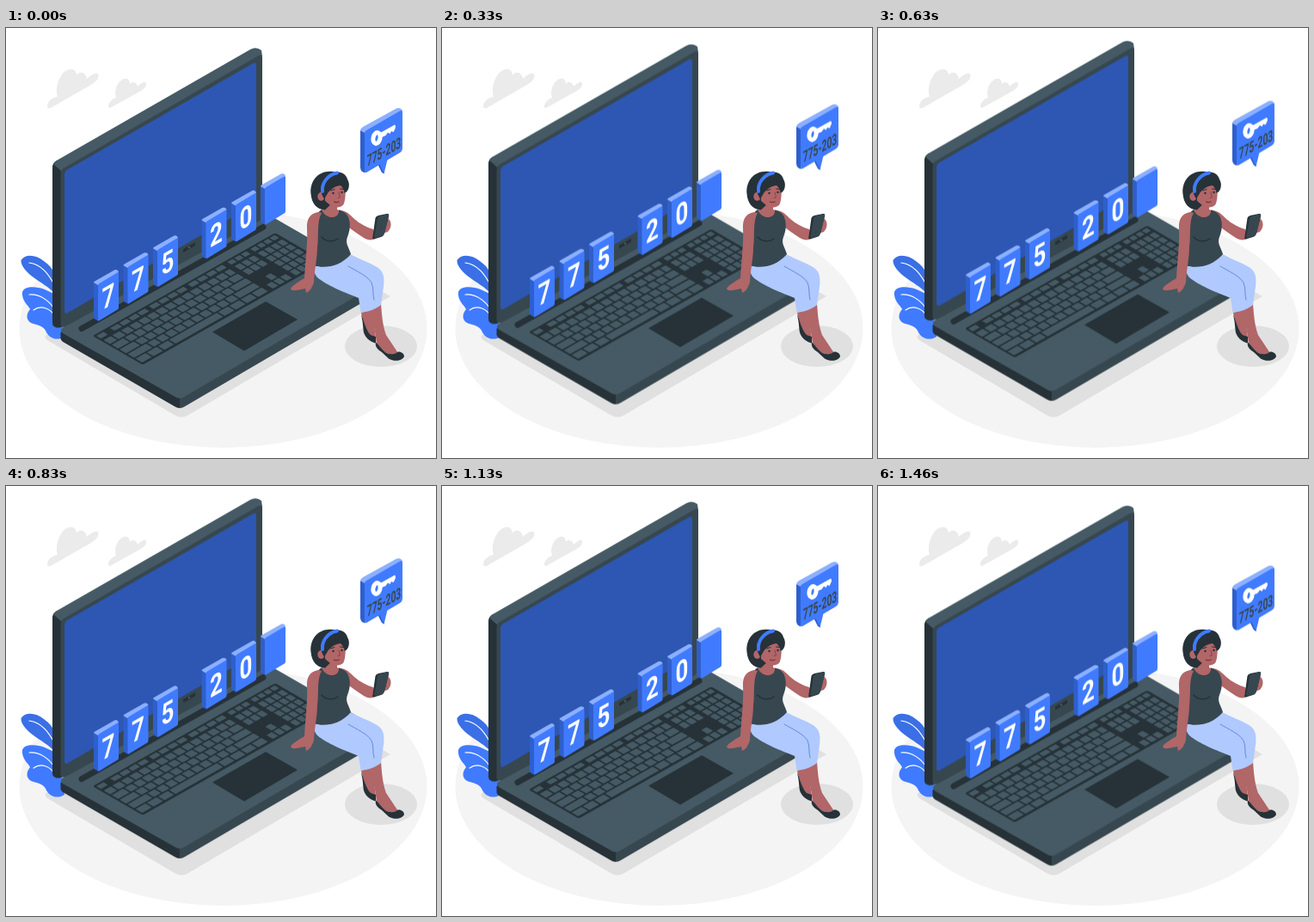
An HTML page that plays this animation: 500x500 px, repeating every 1500 ms.

```html
<!DOCTYPE html>
<html lang="en">
<head>
<meta charset="utf-8">
<title>Verification code</title>
<style>
  html, body { margin: 0; width: 100%; height: 100%; overflow: hidden; background: #fff; }
  svg { display: block; width: 100vw; height: 100vh; }
  text { font-family: Roboto, "Liberation Sans", sans-serif; text-anchor: middle; }
  .ink { fill: #263238; }
  .slate { fill: #37474f; }
  .steel { fill: #455a64; }
  .blue { fill: #407bff; }
  .navy { fill: #2d57b3; }
  .side { fill: #2f5fcc; }
  .sky { fill: #8cb0ff; }
  .skin { fill: #b16668; }
  .mist { fill: #e0e0e0; }
  .cloud { fill: #ebebeb; }
  .line { fill: none; stroke-linecap: round; stroke-linejoin: round; }
</style>
</head>
<body>
<svg viewBox="0 0 500 500">
  <ellipse cx="252.500" cy="349.500" rx="237" ry="138.500" fill="#f4f4f4"/>
  <g class="cloud">
    <path d="M48 91C48 86 53 81 60 80C56 68 64 49 74 48C79 47 82 51 82 55C86 49 93 52 94 59C99 54 107 50 107.500 55C108 59 104 63 99 66L52 93Q48 94 48 91Z"/>
    <path d="M119 91C119 87 123 83 128 81C125 71 131 60 138 59C142 58 144 62 144 65C148 61 152 64 153 68C157 64 163 60 163 65C163 69 160 71 157 73L122 92.500Q119 94 119 91Z"/>
  </g>
  <path class="mist" d="M48 363Q43 359 48 356L290 222L447 312L212 450Q204 455 196 450Z"/>

  <path fill="#3a6fe6" d="M17.500 270C22 263 34 263 44 271C51 276 55 281 58 290V310C50 301 40 296 32 290C25 285 17 277 17.500 270Z"/>
  <path class="blue" d="M19 307C22 299 36 301 45 304L62 312L68 359C62 363 52 363 47 354C45 348 40 346 32 344C24 342 22 334 28 327C26 322 18 318 19 307Z"/>
  <path class="line" stroke="#fff" stroke-width="1.200" d="M27 273C42 275 50 287 57 300M27 310C40 309 52 318 58 330M32 328C40 322 52 325 58 337"/>

  <g id="float">
    <!-- base -->
    <path class="ink" d="M63.500 354V361Q64 364 68 366L196 440Q199 442 202 442V426L70 350Z"/>
    <path class="slate" d="M202 426V442Q205 442 208 440L425 313Q429 310 429 300L420 296Z"/>
    <path class="steel" d="M66 355Q61 351 68 347L294 213Q297 212 300 214L418 282Q432 290 424 302L207 429Q202 432 197 429Z"/>
    <path class="line" stroke="#263238" stroke-width="7" d="M88 349.500L299 231.500"/>
    <g id="keys" transform="matrix(1 -.565 1 .58 101 358)"></g>
    <path class="ink" d="M240 353.500L302 318L339 339L277 375.500Z"/>
    <!-- lid -->
    <path class="ink" d="M54 162Q54 157 59 154L66 166V347Q60 350 56 347Q54 346 54 343Z"/>
    <path class="steel" d="M55 158Q56 156 59 154L284 25Q291 21 297 26L298 33L66 168Z"/>
    <path class="slate" d="M63.500 170Q63.500 165 67 163L292 33Q298 29 298 34V219Q298 222 295 224L69 347Q64 349 63.500 345Z"/>
    <path class="navy" d="M68 171Q68 167 71 165L287.500 41Q291 39.500 291 43V198Q291 203 287 206L72 331Q68 333 68 329Z"/>
    <path class="ink" d="M206 257L220 249V253L206 261Z"/>
    <circle class="steel" cx="213" cy="255" r="1.300"/>
    <g id="cards"></g>
    <!-- speech bubble -->
    <path class="side" d="M432 158L437 168L440 169.500L440 154Z"/>
    <path class="blue" d="M434 158L439.500 169.500L443.500 153Z"/>
    <path class="side" d="M412 119L417.500 121V168.500Q412 167 412 162Z"/>
    <path class="sky" d="M412 119Q412 117 415 115L454 93.500Q458 92 460.500 95L461 97L417 122Z"/>
    <path class="blue" d="M417 122Q417 120 419 119L458 96.500Q461 95 461 98V140Q461 143 458 145L420 167.500Q417 169 417 166Z"/>
    <ellipse cx="431" cy="128" rx="4" ry="6.500" transform="rotate(12 431 128)" class="line" stroke="#fff" stroke-width="5"/>
    <path fill="#fff" d="M435 122L452 112.500Q454 114 452 118L450.500 121L448 120L446.500 123L444 121.500L441.500 125L436 127.500Z"/>
    <text class="slate" transform="matrix(.575 -.32 0 1 439.500 150)" font-size="18" font-weight="600">775-203</text>
  </g>

  <!-- woman -->
  <ellipse class="mist" cx="436" cy="370" rx="42" ry="24"/>
  <path class="skin" d="M413 331L425 327L428 345L430 361C423 360 417 350 413 331Z"/>
  <path class="ink" d="M413 333C416 339 418 351 424 357L430 359V366.500C423 365 416 359 415.500 351Q415 342 413 333Z"/>
  <path class="skin" d="M421 328L436 320C437 334 438 346 442 357L456 378C448 382 438 377 431 369C430 353 427 342 421 328Z"/>
  <path class="ink" d="M430 365.500C429 370 431 373 437 377L445 384.500C452 388.500 461 387 463 382C463 378 458 375.500 455 377C452 380 446 380 441 377C437 374 434 369 430 365.500Z"/>
  <path fill="#b0c9ff" d="M358 276C366 279 384 277 400 263C414 270 428 275 434 280C440 285 440 293 439 301L436 322C430 327 420 331 412.500 330.500L410 314C395 308 372 299 362 290C358 285 357 280 358 276Z"/>
  <path class="line" stroke="#5e84d6" stroke-width=".9" d="M398 277C408 283 420 288 425 296C428 303 426 309 428 316"/>
  <path class="skin" d="M386 212C395 211 400 217 405 222C412 228 420 232 427 234L431 243C426 248 421 247 416 244C408 239 402 234 396 230Z"/>
  <path class="skin" d="M368 198L385 203V211L393 214C389 225 371 225 363 215L369 210Z"/>
  <path class="slate" d="M367 211C360 216 358 223 360 234C362 244 363 252 361 262L358 276C370 280 388 278 401 263C399 255 394 251 397 243C400 236 401 228 398 220C396 215 392 213 387 211.500C388 223 371 223 367 211Z"/>
  <path class="line" stroke="#263238" stroke-width="1.500" d="M367 243C372 249 381 249 386 245"/>
  <path class="skin" d="M363 214C353 216 349.500 222 350 233C351 250 348 270 347 291C342 294 333 299 331 303C332 306.500 338 305 343 304L348 303L349 308C354 306 356 301 358 296C358 285 362 268 362 255C364 243 361 225 367 215Z"/>
  <path class="skin" d="M437 231C440 226 440 222 445 222C449 226 448 233 444 237C440 239 437 238 436 235Z"/>
  <path class="ink" d="M429.500 221Q430 219 433 218L443 216Q446 215.500 445 219L440 239Q439 242 436 243L428 245.500Q425.500 246 426.500 242Z"/>
  <path class="slate" d="M432 221Q432.500 219 435 218.500L443 216.500Q445.500 216 445 219L440 239Q439 241.500 437 242L430 244Q427.500 244 428.500 241Z"/>
  <!-- head -->
  <path class="ink" d="M374 167C361 168 353 180 354.500 193C355.500 204 361 211 371 211.500L383 200L394 192C399 189 400 183 397 177C394 169 385 166 374 167Z"/>
  <path class="skin" d="M371 185C376 177 388 176 394 183C395 190 395 198 393 204C390 210 382 209 378 207L371 201Z"/>
  <ellipse class="skin" cx="366.500" cy="196" rx="4.200" ry="5"/>
  <path class="ink" d="M367 193C367 181 374 169 385 167.500C391 167 396 171 397 176C400 180 399 187 393.500 192C393.500 188 391 185 389 183C382 184 376 188 373 194L370 199Z"/>
  <path class="line" stroke="#407bff" stroke-width="4" d="M368 190C367 181 373 171 385 168.500"/>
  <circle class="ink" cx="380.500" cy="192" r="1.200"/>
  <circle class="ink" cx="390.500" cy="191" r="1.200"/>
  <path class="line" stroke="#263238" stroke-width="1" d="M377.500 189L382 187.500M388.500 187L392.500 187.500"/>
  <path class="line" stroke="#8a4548" stroke-width="1" d="M387 191L388.500 197L386 197.500"/>
  <path class="line" stroke="#7d2f35" stroke-width="1.200" d="M381.500 202Q384 203.500 387 202"/>
</svg>
<script>
  const NS = 'http://www.w3.org/2000/svg';
  const $ = id => document.getElementById(id);

  function add(parent, tag, attrs, text) {
    const el = document.createElementNS(NS, tag);
    for (const k in attrs) el.setAttribute(k, attrs[k]);
    if (text) el.textContent = text;
    return parent.appendChild(el);
  }

  // Keyboard, drawn flat and projected by the group transform
  const GAP = 1.7, ROW = 9.3, keys = $('keys');
  const key = (x, y, w, h = ROW) =>
    add(keys, 'rect', { x, y, width: w - GAP, height: h - GAP, rx: .8, class: 'steel' });
  const run = (x, y, w, n, h) => {
    for (let i = 0; i < n; i++) key(x + i * w, y, w, h);
  };

  add(keys, 'rect', { width: 212, height: 58, rx: 2, class: 'ink' });
  key(2, 2, 10, 7);
  for (const x of [18, 63, 108]) run(x, 2, 10.5, 4, 7);
  run(154, 2, 8, 3, 7);
  run(181, 2, 7.5, 4, 7);
  [10, 15, 18, 23].forEach((first, i) => {
    const y = 10.5 + i * ROW, n = 13 - i, w = 10;
    key(2, y, first);
    run(2 + first, y, w, n);
    key(2 + first + n * w, y, 148 - first - n * w);
  });
  const last = 10.5 + 4 * ROW;
  run(2, last, 13, 3);
  key(41, last, 57);
  run(98, last, 13, 4);
  for (let i = 0; i < 2; i++) run(154, 10.5 + i * ROW, 8, 3);
  key(162, 10.5 + 3 * ROW, 8);
  run(154, last, 8, 3);
  for (let i = 0; i < 5; i++) run(181, 10.5 + i * ROW, 7.5, 4);

  // Code cards
  const SLOPE = .577;
  const card = (x, digit) => {
    const y = 281 - SLOPE * (x - 102);
    const g = add($('cards'), 'g', { transform: `translate(${x} ${y})` });
    add(g, 'path', { class: 'side', d: 'M0 15L6 16V60L2 58Q0 57 0 55Z' });
    add(g, 'path', { class: 'sky', d: 'M0 15Q0 14 2 13L24 .5Q26 -.5 28 1L29 3L5 18Z' });
    add(g, 'path', { class: 'blue', d: 'M5 18Q5 17 6.500 16L27.500 3.500Q29 3 29 4.500V44Q29 45.500 27.500 46.500L7 59Q5 60 5 58Z' });
    if (digit) add(g, 'text', {
      transform: 'matrix(.75 -.43 0 1 17 43)', fill: '#fff', 'font-size': 34.5, 'font-weight': 600
    }, digit);
  };
  [[102, '7'], [136.5, '7'], [171, '5'], [227.5, '2'], [262, '0'], [296, '']]
    .forEach(([x, digit]) => card(x, digit));

  $('float').animate(
    [{ transform: 'translateY(0)' }, { transform: 'translateY(-10px)' }],
    { duration: 750, direction: 'alternate', iterations: Infinity, easing: 'linear' }
  );
</script>
</body>
</html>
```
